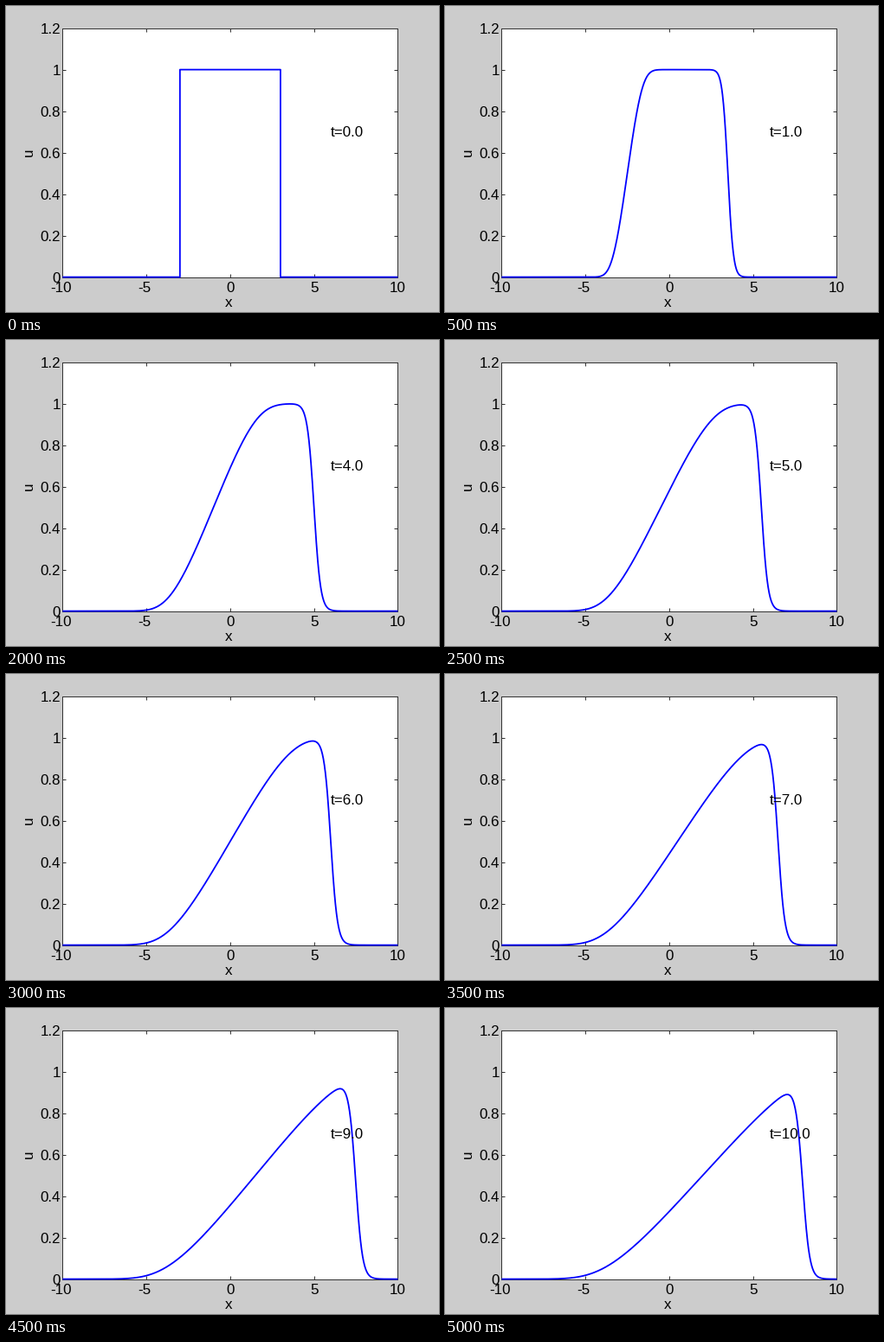
Animation, 500 px wide and 354 px high, one loop 5.5 s. Source, as a matplotlib script:

```python
import math

import matplotlib.pyplot as plt
import numpy as np
from matplotlib.animation import FuncAnimation

W, H = 500, 354
LEFT, RIGHT, TOP, BOTTOM = 65.4, 452.4, 25.6, 313.6
NU = 0.1        # viscosity
EDGE = 3.0      # half width of the initial box
FRAMES = 11
INK = "#333333"

erfc = np.vectorize(math.erfc)
x = np.linspace(-10, 10, 1001)


def burgers(t):
    """Viscous Burgers solution for a unit box, by the Cole-Hopf transform."""
    s = math.sqrt(4 * NU * t)
    left = erfc((x + EDGE) / s)
    right = math.exp(-EDGE / NU) * erfc((EDGE - x) / s)
    inside = erfc((t - EDGE - x) / s) - erfc((t + EDGE - x) / s)
    mid = np.exp(-(x + EDGE) / (2 * NU) + t / (4 * NU)) * inside
    return mid / (left + mid + right)


def profile(t):
    if t == 0:
        return [-10, -EDGE, -EDGE, EDGE, EDGE, 10], [0, 0, 1, 1, 0, 0]
    return x, burgers(t)


fig = plt.figure(figsize=(W / 72, H / 72), dpi=72, facecolor="#cccccc")
ax = fig.add_axes([LEFT / W, 1 - BOTTOM / H,
                   (RIGHT - LEFT) / W, (BOTTOM - TOP) / H])
ax.set(xlim=(-10, 10), ylim=(0, 1.2),
       xticks=range(-10, 11, 5), yticks=np.arange(7) / 5)
ax.tick_params(direction="in", length=4, width=1, color=INK,
               top=True, right=True, labelbottom=False, labelleft=False)
for spine in ax.spines.values():
    spine.set(linewidth=1, edgecolor=INK)


def label(px, py, text, ha="center", **kw):
    return fig.text(px / W, 1 - py / H, text, ha=ha, va="baseline",
                    fontsize=17, family="Liberation Sans", **kw)


for v in range(-10, 11, 5):
    px = LEFT + (v + 10) / 20 * (RIGHT - LEFT)
    label(px - (2.3 if v < 0 else 0), 331, f"{v}")
for i in range(7):
    label(63, BOTTOM - i / 6 * (BOTTOM - TOP) + 6, f"{i / 5:.2g}", ha="right")
label(257.5, 348, "x")
label(31, 169.5, "u", rotation=90, rotation_mode="anchor")
clock = label(375, 151, "", ha="left")

line, = ax.plot([], [], color="#0000ff", lw=1.8, snap=False,
                solid_capstyle="butt", clip_on=False, zorder=3)


def update(frame):
    line.set_data(*profile(frame))
    clock.set_text(f"t={frame:.1f}")
    return line, clock


anim = FuncAnimation(fig, update, frames=FRAMES, interval=500,
                     repeat=True, repeat_delay=0)
plt.show()
```
